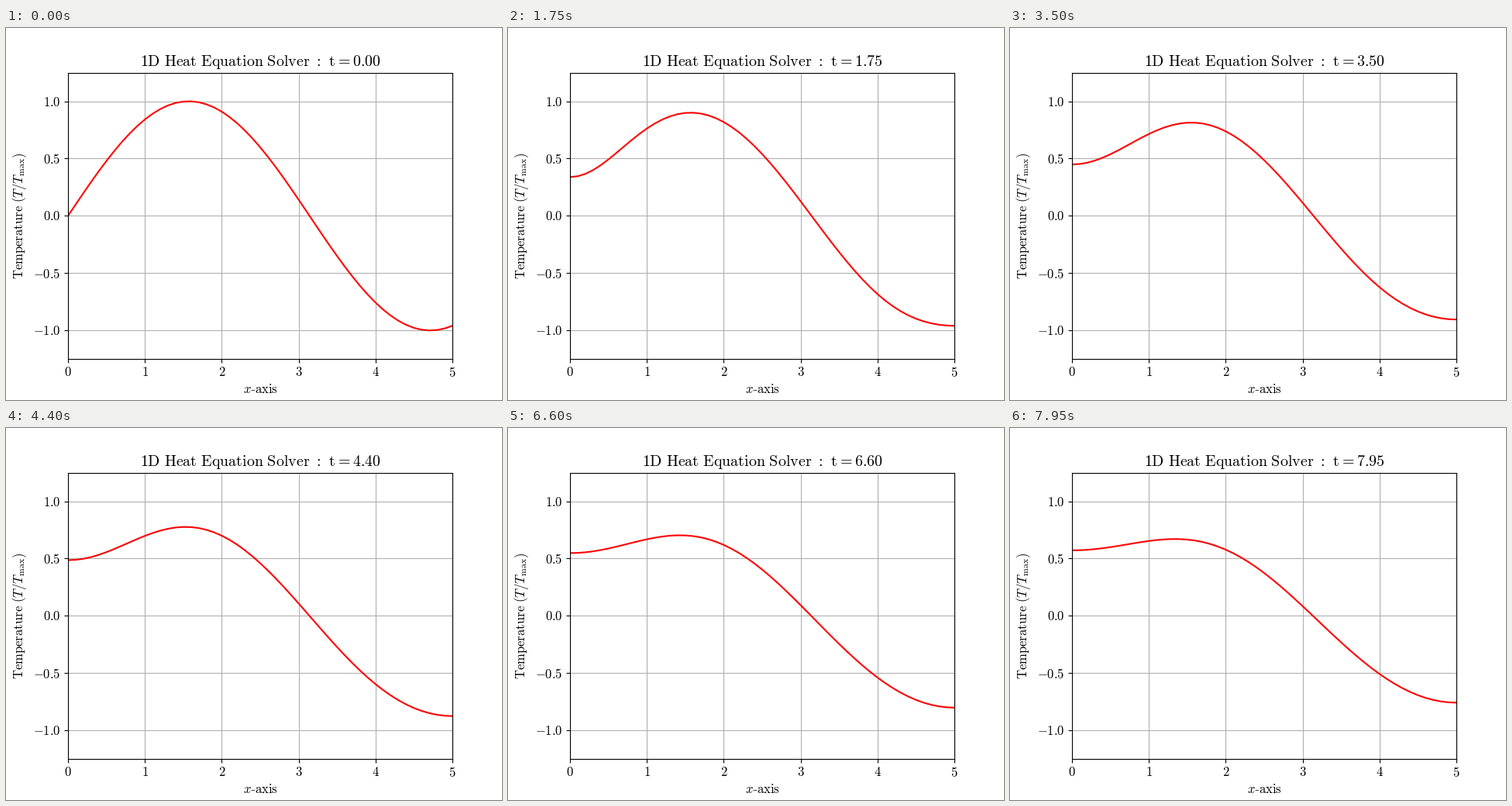
Write a matplotlib script that moves like this. It is 640 by 480 pixels and loops after 8000 ms.

```python
import numpy as np
import matplotlib.pyplot as plt
from matplotlib.animation import FuncAnimation

plt.rcParams["mathtext.fontset"] = "cm"
plt.rcParams["font.family"] = "Liberation Serif"
plt.rcParams["font.size"] = 12

FRAMES, DT = 160, 0.05
ALPHA = 0.06
LENGTH, CELLS = 5.0, 50

# Heat flow on a rod with insulated ends, solved in its cosine modes.
k = np.arange(CELLS + 1)
x = np.linspace(0, LENGTH, CELLS + 1)
modes = np.cos(np.pi * np.outer(k, k) / CELLS)
rates = ALPHA * (2 * CELLS / LENGTH * np.sin(np.pi * k / (2 * CELLS))) ** 2
weights = np.linalg.solve(modes, np.sin(x))


def temperature(t):
    return modes @ (weights * np.exp(-rates * t))


def roman(text):
    return r"\mathrm{" + text.replace(" ", r"\ ") + "}"


def heading(t):
    name = roman("1D Heat Equation Solver {:}")
    clock = roman(f"t{{=}}{t:.2f}")
    return rf"${name}\hspace{{0.44}}{clock}$"


fig, ax = plt.subplots(figsize=(6.4, 4.8), dpi=100)
ax.set_xlim(0, LENGTH)
ax.set_ylim(-1.25, 1.25)
xticks = range(6)
yticks = np.arange(-1, 1.5, 0.5)
ax.set_xticks(xticks, [f"${v}$" for v in xticks])
ax.set_yticks(yticks, [f"${v:.1f}$" for v in yticks])
ax.grid(True)
ax.set_xlabel(f"$x$-${roman('axis')}$")
ax.set_ylabel(rf"${roman('Temperature (')}T/T_{{{roman('max')}}}{roman(')')}$")
title = ax.set_title(heading(0))
line, = ax.plot(x, temperature(0), color="red", lw=1.5)


def update(i):
    t = i * DT
    line.set_ydata(temperature(t))
    title.set_text(heading(t))
    return line, title


anim = FuncAnimation(fig, update, frames=FRAMES, interval=50, repeat=True)
plt.show()
```
